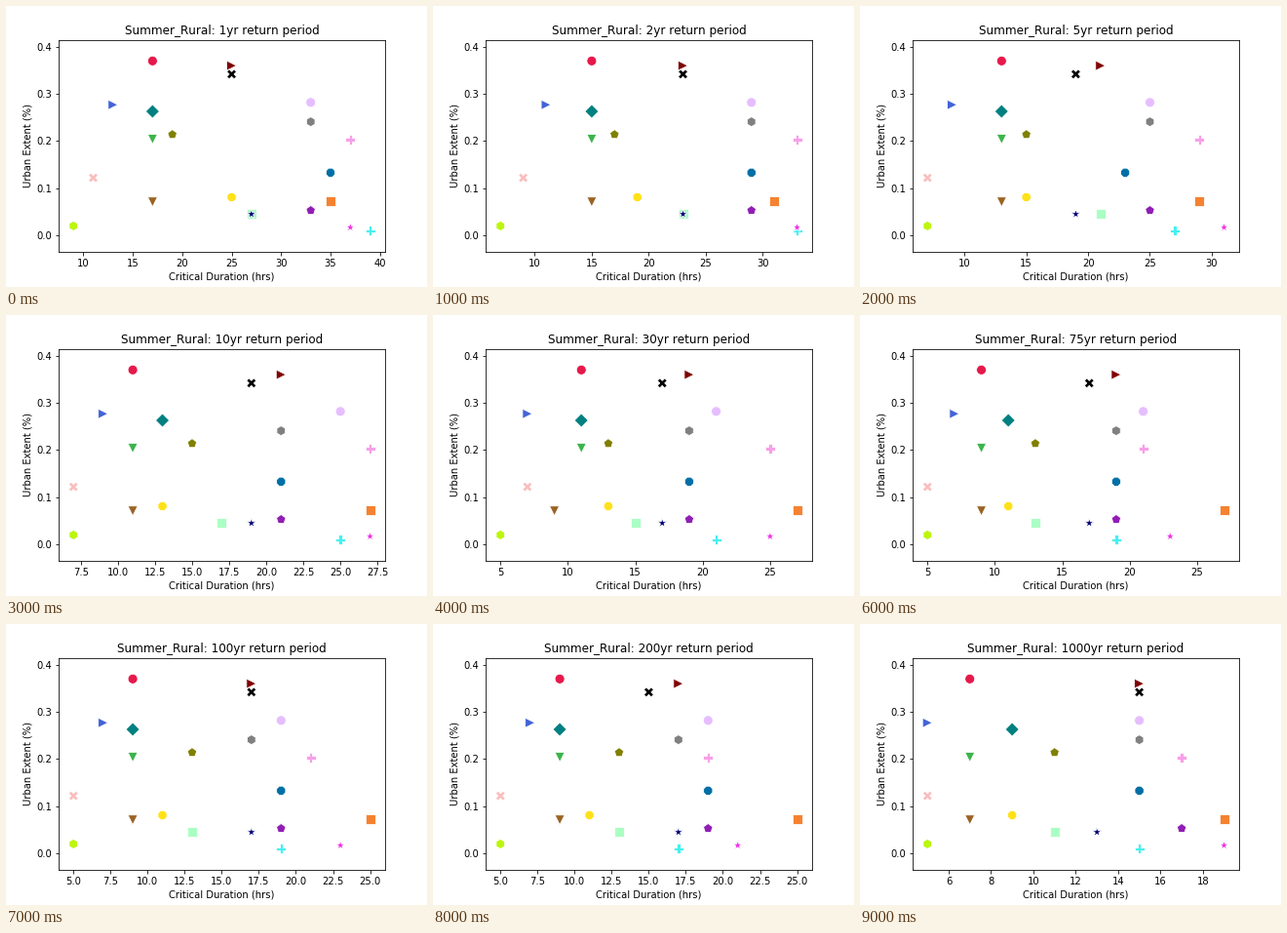
These frames come from a looping animation (432 by 288 pixels, 10 s). A matplotlib script:

```python
import numpy as np
import matplotlib.pyplot as plt
from matplotlib.animation import FuncAnimation
from matplotlib.markers import MarkerStyle

plt.rcParams["font.family"] = "DejaVu Sans"
plt.rcParams["text.kerning_factor"] = 6

PERIODS = [1, 2, 5, 10, 30, 50, 75, 100, 200, 1000]
KEY_PERIODS = [1, 10, 75, 1000]
MARKERS = "ov8>spP*hXD"

# colour, urban extent, hours at the key periods
SITES = [
    ("#e6194b", 0.370, 17, 11, 9.5, 7),
    ("#3cb44b", 0.204, 17, 11, 9.5, 7),
    ("#ffe119", 0.081, 24, 13, 11.5, 9),
    ("#4363d8", 0.277, 13, 8, 7, 5),
    ("#f58231", 0.072, 35, 27, 26.7, 19.9),
    ("#911eb4", 0.053, 33, 21.5, 18.5, 17.5),
    ("#46f0f0", 0.010, 38.5, 24, 19, 15),
    ("#f032e6", 0.017, 37.9, 27.7, 24, 18.5),
    ("#bcf60c", 0.020, 9, 6, 4.5, 4.5),
    ("#fabebe", 0.122, 11, 7, 5.5, 5),
    ("#008080", 0.263, 17, 12, 10, 9),
    ("#e6beff", 0.282, 32, 24, 20, 15),
    ("#9a6324", 0.071, 17, 11, 9, 7),
    ("#006fa6", 0.133, 35, 20.2, 19.5, 15.9),
    ("#800000", 0.360, 25, 20, 18, 15),
    ("#aaffc3", 0.045, 27.5, 17.9, 14, 11),
    ("#808000", 0.214, 19, 14, 13, 11),
    ("#f79fe8", 0.203, 37, 27.5, 21.5, 17),
    ("#000075", 0.045, 26, 18, 17.5, 13.9),
    ("#808080", 0.241, 33, 21.5, 18, 15),
    ("#000000", 0.342, 25, 18, 16.5, 15),
]
COLORS = [site[0] for site in SITES]
EXTENTS = [site[1] for site in SITES]


def scale(period):
    return np.log10(period) ** 0.75


def durations(period):
    """Interpolate between the key periods and settle on odd hours."""
    hours = [np.interp(scale(period), scale(KEY_PERIODS), site[2:])
             for site in SITES]
    return 2 * np.floor(np.array(hours) / 2) + 1


def marker_path(k):
    style = MarkerStyle(MARKERS[k % len(MARKERS)])
    return style.get_path().transformed(style.get_transform())


PATHS = [marker_path(k) for k in range(len(SITES))]

fig = plt.figure(figsize=(6, 4), dpi=72, facecolor="white")
ax = fig.add_axes([0.125, 0.125, 0.775, 0.755])


def draw(i):
    ax.clear()
    xs = durations(PERIODS[i])
    dots = ax.scatter(xs, EXTENTS, s=100, c=COLORS,
                      edgecolors="white", linewidths=0.8)
    dots.set_paths(PATHS)
    pad = 0.05 * np.ptp(xs)
    ax.set_xlim(xs.min() - pad, xs.max() + pad)
    ax.set_ylim(-0.035, 0.415)
    ax.set_yticks(np.arange(5) / 10)
    ax.set_title(f"Summer_Rural: {PERIODS[i]}yr return period")
    ax.set_xlabel("Critical Duration (hrs)")
    ax.set_ylabel("Urban Extent (%)")
    return []


anim = FuncAnimation(fig, draw, frames=len(PERIODS), interval=1000,
                     init_func=lambda: draw(0), repeat=True, repeat_delay=0)
plt.show()
```
